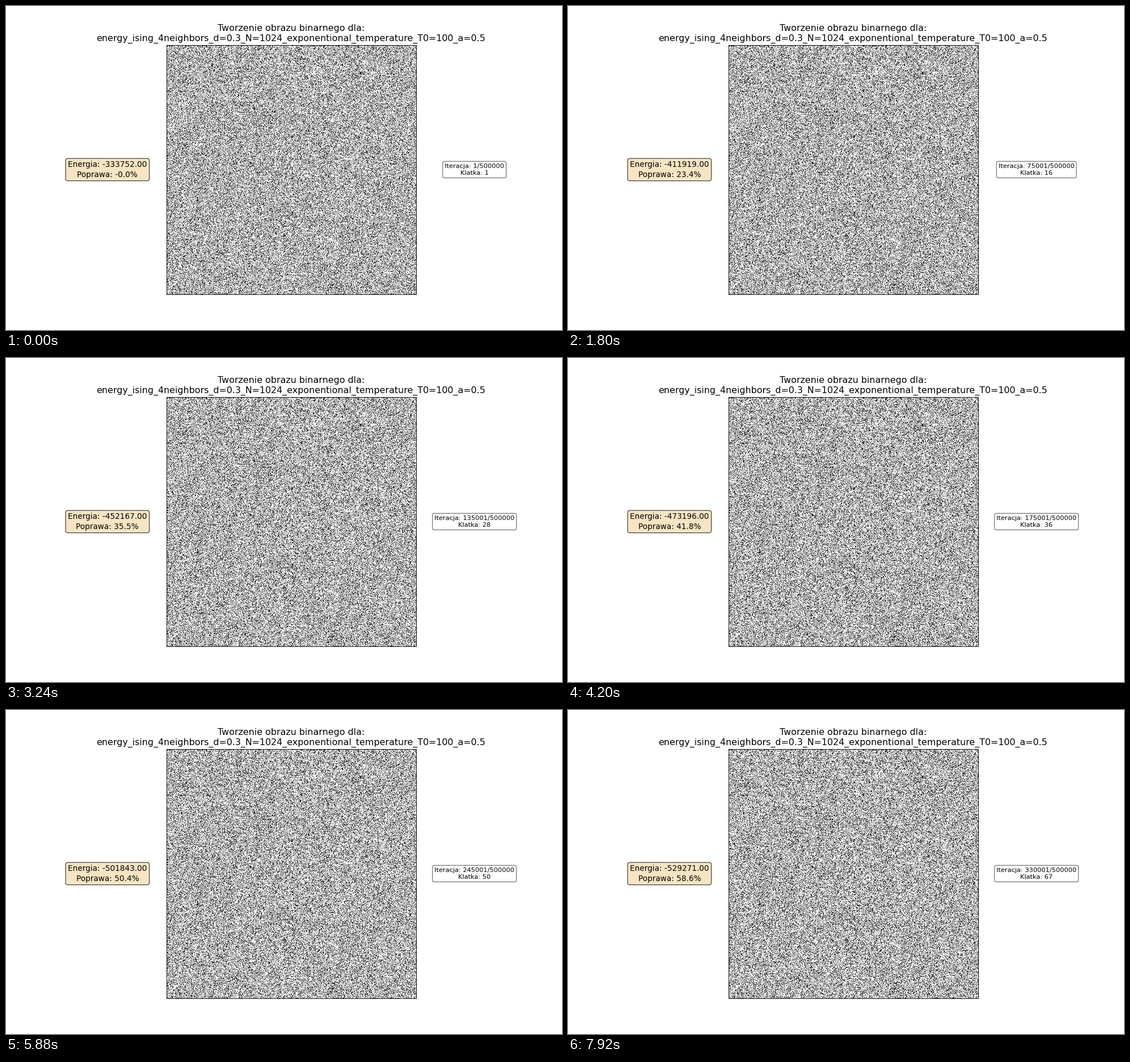
Animation of 980 by 572 pixels, one loop 8 s. Source, as a matplotlib script:

```python
import matplotlib.pyplot as plt
import numpy as np
from matplotlib.animation import FuncAnimation

W, H, DPI = 980, 572, 80
PT = W / 12 / DPI          # type and line scale of a 12 inch wide layout
TICK, HOLD, FRAMES = 40, 3, 200
STEPS = (FRAMES - 1) // HOLD + 1
N, DENSITY, BATCH, TOTAL = 1024, 0.3, 5000, 500000
SAMPLE, VIEW = 539, 440    # grid points picked, then pixels shown
LEFT, BOTTOM = 283, 63     # corner of the picture in pixels
MID_X, MID_Y, SIDE = 0.5125, 0.495, 0.33

plt.rcParams["font.family"] = "DejaVu Sans"


def energy_curve():
    """Smooth descent through a few measured energies."""
    step = np.array([0, 6, 15, 27, 35, 49, 66]) / 66
    level = [333752, 370835, 411919, 452167, 473196, 501843, 529271]
    fit = np.polyfit(step, level, len(level) - 1)
    return -np.round(np.polyval(fit, np.arange(STEPS) / 66))


def shrink_matrix():
    """Lanczos weights that reduce SAMPLE points to VIEW pixels."""
    scale = SAMPLE / VIEW
    centre = (np.arange(VIEW)[:, None] + 0.5) * scale - 0.5
    t = (centre - np.arange(SAMPLE)) / scale
    weight = np.sinc(t) * np.sinc(t / 3) * (np.abs(t) < 3)
    return weight / weight.sum(axis=1, keepdims=True)


def neighbour_sum(grid, y, x):
    return (grid[y - 1, x] + grid[(y + 1) % N, x]
            + grid[y, x - 1] + grid[y, (x + 1) % N])


def anneal(energy):
    """Swap random spin pairs that lower the energy, keeping to its curve."""
    rng = np.random.default_rng(7)
    grid = np.where(rng.random((N, N)) < DENSITY, -1, 1).astype(np.int8)
    pick = ((np.arange(SAMPLE) + 0.5) * N / SAMPLE).astype(int)
    shrink = shrink_matrix()
    views = []
    for drop in -np.diff(energy, append=energy[-1]):
        view = shrink @ grid[np.ix_(pick, pick)] @ shrink.T
        views.append(np.clip(view, -1, 1))
        y1, x1, y2, x2 = rng.integers(0, N, (4, 4 * BATCH))
        a, b = grid[y1, x1], grid[y2, x2]
        gain = (b - a) * (neighbour_sum(grid, y1, x1)
                          - neighbour_sum(grid, y2, x2))
        gain = np.maximum(gain, 0).astype(int)
        ok = (gain > 0) & (np.cumsum(gain) <= drop)
        grid[y1[ok], x1[ok]] = b[ok]
        grid[y2[ok], x2[ok]] = a[ok]
    return views


energy = energy_curve()
views = anneal(energy)

fig = plt.figure(figsize=(W / DPI, H / DPI), dpi=DPI)
ax = fig.add_axes([LEFT / W, BOTTOM / H, VIEW / W, VIEW / H])
image = ax.imshow(views[0], cmap="gray", vmin=-1, vmax=1,
                  interpolation="nearest", aspect="auto")
ax.set_xticks([])
ax.set_yticks([])
for spine in ax.spines.values():
    spine.set_linewidth(0.8 * PT)
fig.text(MID_X, 0.892,
         "Tworzenie obrazu binarnego dla:\n"
         "energy_ising_4neighbors_d=0.3_N=1024_"
         "exponentional_temperature_T0=100_a=0.5",
         fontsize=14 * PT, ha="center", va="baseline")


def label(x, size, color, alpha):
    box = dict(boxstyle="round", facecolor=color, alpha=alpha,
               linewidth=PT)
    return fig.text(x, MID_Y, "", ha="center", va="center",
                    fontsize=size * PT, linespacing=1.3, bbox=box)


energy_label = label(MID_X - SIDE, 12, "wheat", 0.8)
count_label = label(MID_X + SIDE, 10, "white", 0.6)


def update(n):
    k = n // HOLD
    gain = 100 * (energy[k] - energy[0]) / energy[0]
    image.set_data(views[k])
    energy_label.set_text(f"Energia: {energy[k]:.2f}\nPoprawa: {gain:.1f}%")
    count_label.set_text(f"Iteracja: {k * BATCH + 1}/{TOTAL}\n"
                         f"Klatka: {k + 1}")
    return image, energy_label, count_label


anim = FuncAnimation(fig, update, frames=FRAMES, interval=TICK,
                     init_func=lambda: update(0), repeat=True,
                     repeat_delay=0, blit=False)
plt.show()
```
